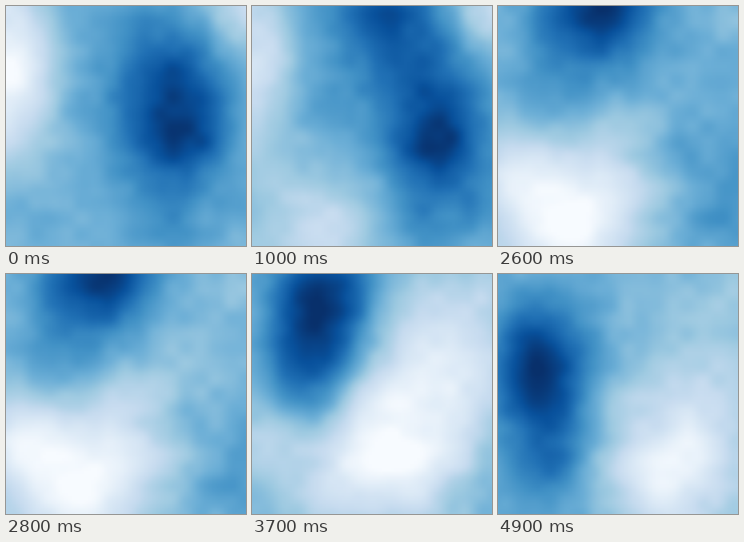
An HTML page with a canvas for the animation above (5 s loop, 300 px wide and 300 px high).

```html
<!DOCTYPE html>
<html lang="en">
<head>
<meta charset="utf-8">
<title>Drifting clouds</title>
<style>
html, body { margin: 0; width: 100%; height: 100%; overflow: hidden; background: #6baed6; }
canvas { display: block; width: 100vw; height: 100vh; }
</style>
</head>
<body>
<canvas id="sky" width="300" height="300"></canvas>
<script>
const SIZE = 300, CELLS = 75, LOOP = 5000, STEP = 100, BASE = .47;
const RAMP = ['#f7fbff', '#deebf7', '#c6dbef', '#9ecae1', '#6baed6', '#4292c6', '#2171b5', '#08519c', '#08306b']
  .map(hex => [1, 3, 5].map(i => parseInt(hex.slice(i, i + 2), 16)));

// Each soft mass swells and fades around its peak (seconds) while drifting (px/s).
// A positive tone darkens, a negative one lightens.
const masses = [
  // dark
  { at: [215, 148], drift: [22, 28],   size: [75, 110],  tone: .52,  peak: .3,  span: 3.6 },
  { at: [150, 0],   drift: [-28, 0],   size: [75, 80],   tone: .53,  peak: 1.9, span: 2.3 },
  { at: [80, 120],                     size: [110, 80],  tone: .13,  peak: 1.8, span: 1.6 },
  { at: [69, 81],   drift: [-32, 62],  size: [65, 85],   tone: .58,  peak: 4.3, span: 2.2 },
  { at: [70, 195],  drift: [0, 75],    size: [60, 75],   tone: .28,  peak: 4.4, span: 2.4 },
  // light
  { at: [0, 80],                       size: [55, 95],   tone: -.5,  peak: .3,  span: 1.6 },
  { at: [300, 0],                      size: [65, 80],   tone: -.38, peak: .5,  span: 1.3 },
  { at: [85, 275],  drift: [0, -5],    size: [95, 75],   tone: -.5,  peak: 2.1, span: 2.1 },
  { at: [15, 205],                     size: [60, 55],   tone: -.3,  peak: 3.1, span: 1.2 },
  { at: [240, 100], drift: [25, 10],   size: [105, 95],  tone: -.36, peak: 3.9, span: 1.8 },
  { at: [190, 233], drift: [40, 18],   size: [95, 85],   tone: -.48, peak: 4.2, span: 2.4 }
];

function massAt({ at, drift = [0, 0], size, tone, peak, span }, t) {
  const dt = t - peak;
  const swell = Math.abs(dt) < span ? Math.cos(dt / span * Math.PI / 2) ** 2 : 0;
  const profile = axis => {
    const centre = at[axis] + drift[axis] * dt;
    return pos => Math.exp(-(((pos - centre) / size[axis]) ** 2));
  };
  return { tone: tone * swell, across: profile(0), down: profile(1) };
}

function hash(x, y) {
  const s = Math.sin(x * 127.1 + y * 311.7) * 43758.5453;
  return s - Math.floor(s);
}

const fade = u => u * u * (3 - 2 * u);
const mix = (a, b, u) => a + (b - a) * u;

function noise(x, y) {
  const i = Math.floor(x), j = Math.floor(y), u = fade(x - i), v = fade(y - j);
  return mix(mix(hash(i, j), hash(i + 1, j), u), mix(hash(i, j + 1), hash(i + 1, j + 1), u), v) - .5;
}

// Two octaves drifting in different directions.
const texture = (x, y, t) =>
  .1 * noise(x / 42 + t * .25, y / 42 - t * .15) + .06 * noise(x / 19 - t * .3, y / 19 + t * .4);

const screen = document.getElementById('sky').getContext('2d');
const buffer = document.createElement('canvas');
buffer.width = buffer.height = CELLS;
const bctx = buffer.getContext('2d');
const image = bctx.createImageData(CELLS, CELLS);

function draw(t) {
  const active = masses.map(m => massAt(m, t)).filter(m => m.tone);
  let p = 0;
  for (let j = 0; j < CELLS; j++) {
    const y = (j + .5) * SIZE / CELLS;
    for (let i = 0; i < CELLS; i++) {
      const x = (i + .5) * SIZE / CELLS;
      let d = BASE + texture(x, y, t);
      for (const m of active) d += m.tone * m.across(x) * m.down(y);
      const q = Math.min(.9999, Math.max(0, d)) * (RAMP.length - 1);
      const k = Math.floor(q);
      for (let c = 0; c < 3; c++) image.data[p++] = mix(RAMP[k][c], RAMP[k + 1][c], q - k);
      image.data[p++] = 255;
    }
  }
  bctx.putImageData(image, 0, 0);
  screen.drawImage(buffer, 0, 0, SIZE, SIZE);
}

const start = performance.now();
let shown = -1;

function tick() {
  const ms = Math.floor((performance.now() - start) % LOOP / STEP) * STEP;
  if (ms !== shown) {
    shown = ms;
    draw(ms / 1000);
  }
  requestAnimationFrame(tick);
}
tick();
</script>
</body>
</html>
```
